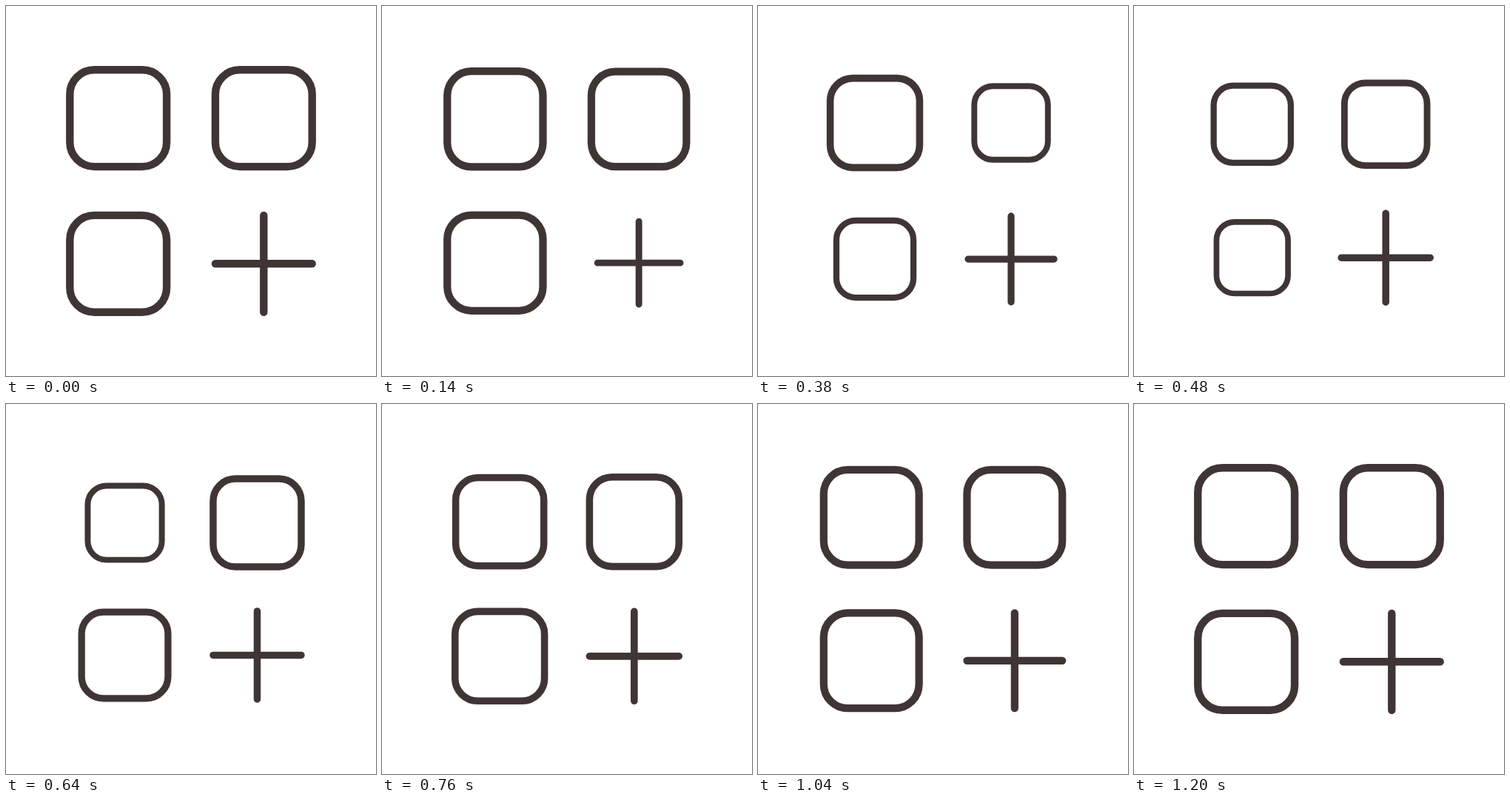
An HTML page for the animation above (1500 ms loop, 500 px wide and 500 px high).

```html
<!DOCTYPE html>
<html>
<head>
<meta charset="utf-8">
<style>
  html, body { margin: 0; height: 100%; overflow: hidden; background: #fff; }
  svg { display: block; width: 100%; height: 100%; }
  #icon { fill: none; stroke: #403535; stroke-width: 10.4; stroke-linecap: round; }
</style>
</head>
<body>
<svg viewBox="0 0 500 500">
  <defs>
    <rect id="tile" x="-65.4" y="-65.4" width="130.8" height="130.8" rx="33"/>
    <path id="plus" d="M-65.4 0H65.4M0-65.4V65.4"/>
  </defs>
  <g id="icon">
    <use href="#plus"/>
    <use href="#tile"/>
    <use href="#tile"/>
    <use href="#tile"/>
  </g>
</svg>
<script>
  const LOOP = 1500, MOVE = 1200, PULSE = 458, STAGGER = 114, STEP = 20;
  const OFFSET = 98.3;
  const icon = document.getElementById('icon');
  // Pulse order: bottom right, top right, bottom left, top left
  const corners = [[1, 1], [1, -1], [-1, 1], [-1, -1]];

  // Smooth 0 -> 1 -> 0 over the given duration, 0 outside it
  const dip = (t, duration) =>
    t > 0 && t < duration ? Math.sin(Math.PI * t / duration) ** 2 : 0;

  function draw(now) {
    const t = Math.floor(now % LOOP / STEP) * STEP;
    const zoom = 1 - dip(t, MOVE) / 11;
    icon.setAttribute('transform', `translate(250 250) scale(${zoom})`);
    corners.forEach(([x, y], i) => {
      const scale = 1 - 0.2 * dip(t - i * STAGGER, PULSE);
      icon.children[i].setAttribute('transform',
        `translate(${x * OFFSET} ${y * OFFSET}) scale(${scale})`);
    });
  }

  const start = performance.now();
  function tick() {
    draw(performance.now() - start);
    requestAnimationFrame(tick);
  }
  tick();
</script>
</body>
</html>
```
